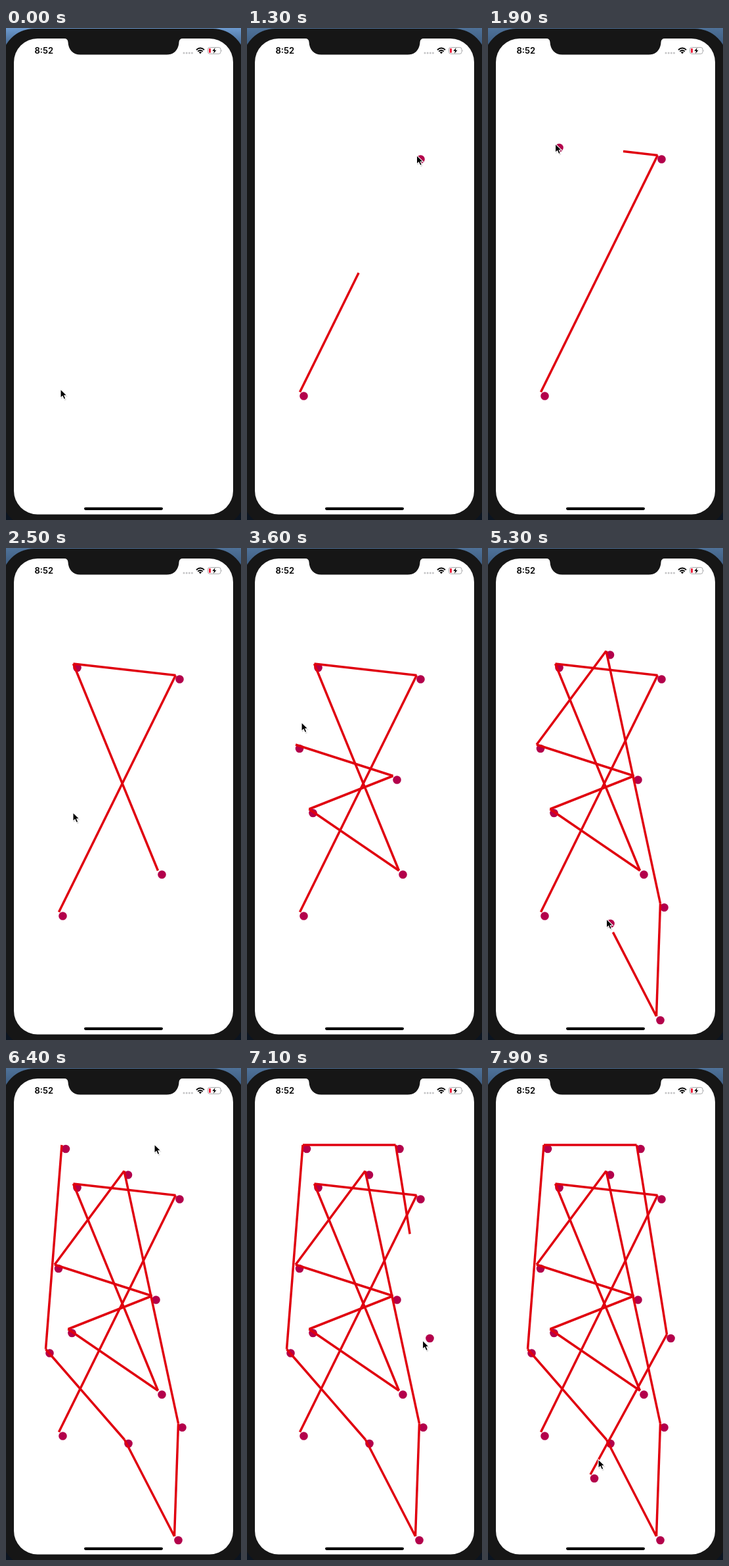
Recreate the animation shown at these times as an HTML page. Size 358 by 748 pixels, loop 8000 ms.

```html
<!DOCTYPE html>
<html lang="en">
<head>
<meta charset="utf-8">
<title>Connected dots</title>
<style>
  html, body { margin: 0; width: 100%; height: 100%; overflow: hidden; background: #0b1420; }
  svg { display: block; width: 358px; height: 748px; }
  text { font: 600 13px Inter, Roboto, sans-serif; }
</style>
</head>
<body>
<svg viewBox="0 0 358 748">
  <defs>
    <linearGradient id="sky" x2="0" y2="1">
      <stop id="skyTop" stop-color="#6d9bd0"/>
      <stop offset=".05" stop-color="#355377"/>
      <stop offset=".12" stop-color="#14202f"/>
      <stop offset="1" stop-color="#0b1420"/>
    </linearGradient>
  </defs>
  <rect width="358" height="748" fill="url(#sky)"/>
  <rect x="-7" y="1" width="372" height="759" rx="50" fill="#161616"/>
  <rect x="12" y="16" width="334" height="723.5" rx="36" fill="#fff"/>
  <path d="M89 15.5V16Q94 16 94.500 21.500C95 33 102 40.500 113 40.500H245C256 40.500 263 33 263.500 21.500Q264 16 269 16V15.500Z" fill="#161616"/>

  <text x="43.500" y="39">8:52</text>
  <g fill="#c4c4c6">
    <circle cx="271" cy="38" r="1.500"/><circle cx="275.200" cy="38" r="1.500"/>
    <circle cx="279.300" cy="38" r="1.500"/><circle cx="283.400" cy="38" r="1.500"/>
  </g>
  <g fill="none" stroke="#000" stroke-width="1.900">
    <path d="M290 33.200Q296 27.800 302 33.200M292.200 35.600Q296 32.200 299.800 35.600"/>
    <path d="M293.800 37L296 39.300L298.200 37Q296 35.200 293.800 37Z" fill="#000" stroke="none"/>
  </g>
  <rect x="307.500" y="29.500" width="19.500" height="9.800" rx="2.800" fill="none" stroke="#a9a9ab"/>
  <path d="M328 32.700Q329.600 34.400 328 36.200Z" fill="#a9a9ab"/>
  <rect x="309" y="31" width="3" height="6.800" rx="1" fill="#f0203c"/>
  <path d="M318.600 30L314.300 35H317L316 39L320.400 33.700H317.700Z"/>

  <g id="drawing"></g>
  <rect x="119" y="728.700" width="120" height="4.200" rx="2.100"/>
  <g id="cursor">
    <path d="M1 2V15L4 12.400L6.300 17.400L9 16.200L7 11.400H11Z" fill="#000" opacity=".14"/>
    <path d="M0 0V13.400L3.100 10.700L5.300 15.600L7.900 14.500L5.800 9.700H9.800Z" stroke="#fff" stroke-width="1.100"/>
  </g>
</svg>
<script>
const LOOP = 8000, DRAW = 300, OFFSET = 6;

// Each tap: time, dot centre
const taps = [
  [550, 86.5, 559.5], [1150, 264.5, 199.5], [1800, 108.5, 182], [2170, 237.5, 496.5],
  [2600, 100.5, 403], [2950, 228.5, 352.5], [3280, 80, 305], [3850, 186, 162.5],
  [4280, 268.5, 546.5], [4650, 262.5, 718], [5040, 186.5, 571], [5540, 66.5, 433.5],
  [6000, 91, 123], [6480, 232.5, 123], [6960, 278.5, 411], [7450, 162, 624]
];

// Cursor rests at every tap; the extra points are pauses and drifts
const path = [
  [0, 83, 549], [1320, 258.5, 193.5], [2500, 102, 402], [3600, 83, 265],
  [5310, 180.5, 564], [6400, 226, 116], [7900, 168, 595], [8000, 170, 591]
];
for (const [t, x, y] of taps)
  path.push([t - 60, x - OFFSET, y - OFFSET], [t + 100, x - OFFSET, y - OFFSET]);
path.sort((a, b) => a[0] - b[0]);

const byId = id => document.getElementById(id);
const clamp = v => Math.max(0, Math.min(1, v));
const mix = (a, b, k) => a + (b - a) * k;

function add(tag, attrs) {
  const el = document.createElementNS("http://www.w3.org/2000/svg", tag);
  for (const name in attrs) el.setAttribute(name, attrs[name]);
  return byId("drawing").appendChild(el);
}

const marks = taps.map(([t, x, y], i) => {
  const dot = add("circle", { cx: x, cy: y, r: 6.3, fill: "#b3004b" });
  if (!i) return { t, dot };
  const from = taps[i - 1].slice(1).map(v => v - OFFSET);
  const line = add("line", { x1: from[0], y1: from[1], stroke: "#e0000f", "stroke-width": 3.5 });
  return { t, dot, line, from, to: [x - OFFSET, y - OFFSET] };
});

function show(el, on) {
  el.setAttribute("visibility", on ? "visible" : "hidden");
}

function render(t) {
  for (const { t: start, dot, line, from, to } of marks) {
    show(dot, t >= start);
    if (!line) continue;
    const k = clamp((t - start) / DRAW);
    show(line, k > 0);
    line.setAttribute("x2", mix(from[0], to[0], k));
    line.setAttribute("y2", mix(from[1], to[1], k));
  }
  const next = Math.max(1, path.findIndex(p => p[0] > t));
  const a = path[next - 1], b = path[next];
  const s = clamp((t - a[0]) / (b[0] - a[0])), k = s * s * (3 - 2 * s);
  byId("cursor").setAttribute("transform", `translate(${mix(a[1], b[1], k)} ${mix(a[2], b[2], k)})`);
  byId("skyTop").setAttribute("stop-color", t < 100 ? "#6d9bd0" : "#4f7299");
}

const begin = performance.now();
function tick() {
  render((performance.now() - begin) % LOOP);
  requestAnimationFrame(tick);
}
tick();
</script>
</body>
</html>
```
